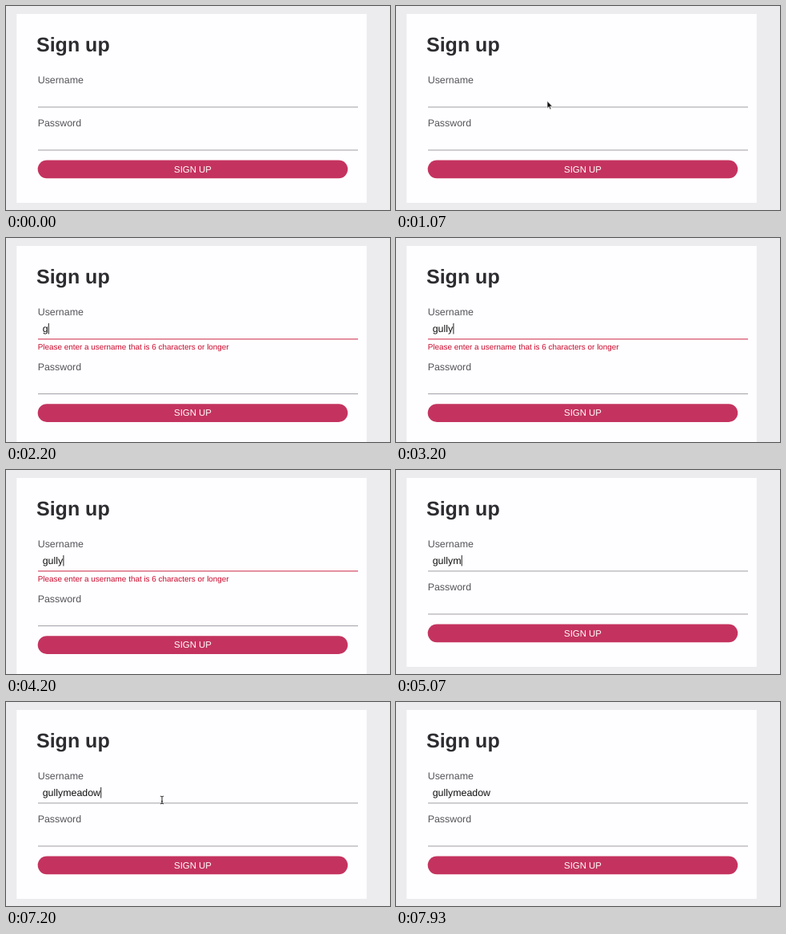
Write an HTML page that moves like this. It is 480 by 256 pixels and loops after 8 s.

```html
<!DOCTYPE html>
<html lang="en">
<head>
<meta charset="utf-8">
<title>Sign up form</title>
<style>
html, body { margin: 0; width: 100%; height: 100%; overflow: hidden; background: #ecebee; }
svg { display: block; width: 480px; height: 256px; }
text { font-family: "Liberation Sans", Arial, sans-serif; text-rendering: geometricPrecision; white-space: pre; }
.label { font-size: 12.4px; fill: #555459; }
.rule { height: 1px; width: 400px; fill: #a09fa3; }
</style>
</head>
<body>
<svg viewBox="0 0 480 256">
  <rect width="480" height="256" fill="#ecebee"/>
  <rect id="card" x="13.3" y="10" width="437.5" height="237" fill="#fefdff"/>
  <text x="38" y="57.3" font-size="25" font-weight="700" fill="#2d2c30">Sign up</text>
  <text class="label" x="39.7" y="97.2">Username</text>
  <text id="value" x="45.7" y="117.6" font-size="12.4" fill="#111"></text>
  <rect id="caret" y="107" width="1" height="13.5" fill="#222"/>
  <rect id="rule" class="rule" x="40" y="126.4"/>
  <text id="error" x="39.7" y="139.8" font-size="9.92" fill="#cb0a2c">Please enter a username that is 6 characters or longer</text>
  <g id="lower">
    <text class="label" x="39.7" y="151">Password</text>
    <rect class="rule" x="40" y="180.4"/>
    <rect x="39.7" y="193.5" width="387.5" height="22.7" rx="11.35" fill="#c4335f"/>
    <text x="233.5" y="208.7" font-size="11.4" text-anchor="middle" fill="#fff">SIGN UP</text>
  </g>
  <path id="arrow" d="M0 0V9.2L2.1 7.2L3.6 10.6L5.1 10L3.6 6.7H6.5Z" fill="#111" stroke="#fff" stroke-width=".7"/>
  <path id="beam" d="M-2-4.8Q0-4.8 0-3.6Q0-4.8 2-4.8M0-3.6V3.6M-2 4.8Q0 4.8 0 3.6Q0 4.8 2 4.8M-1 1.6H1" fill="none" stroke="#222"/>
</svg>
<script>
const LOOP = 8000, BLINK = 500, SHIFT = 14.7;
const FOCUS = 1200, MIN_LENGTH = 6;
const NAME = "gullymeadow";
const KEYS = [1730, 2600, 2800, 2950, 3130, 4730, 5400, 5600, 5870, 5930, 6070];
// Pointer keyframes: time, x, y
const ENTER = [[470, 204, 172], [870, 190, 122], [1070, 189, 119.3], [1250, 189, 119.3], [1730, 192, 122]];
const LEAVE = [[6870, 195, 123], [7250, 195, 123], [7460, 199, 172], [7670, 204, 226], [7860, 209, 262]];

const el = id => document.getElementById(id);
const value = el("value"), caret = el("caret"), rule = el("rule");
const show = (node, on) => node.setAttribute("visibility", on ? "visible" : "hidden");

function along(path, t) {
  if (t < path[0][0] || t >= path[path.length - 1][0]) return null;
  const i = path.findIndex(p => p[0] > t);
  const [t0, x0, y0] = path[i - 1], [t1, x1, y1] = path[i];
  const u = (t - t0) / (t1 - t0);
  return [x0 + (x1 - x0) * u, y0 + (y1 - y0) * u];
}

function drawPointer(t) {
  const pos = along(ENTER, t) || along(LEAVE, t);
  const overInput = pos && (t > FOCUS && pos[1] < 128 || t > 6000 && pos[1] > 158 && pos[1] < 181);
  show(el("arrow"), pos && !overInput);
  show(el("beam"), overInput);
  if (pos) el(overInput ? "beam" : "arrow").setAttribute("transform", `translate(${pos})`);
}

function render(t) {
  const typed = KEYS.filter(k => k <= t).length;
  const invalid = typed > 0 && typed < MIN_LENGTH;
  value.textContent = NAME.slice(0, typed);

  const since = t - (typed ? KEYS[typed - 1] : FOCUS);
  show(caret, since >= 0 && Math.floor(since / BLINK) % 2 === 0);
  caret.setAttribute("x", 45.9 + (typed ? value.getComputedTextLength() : 0));

  show(el("error"), invalid);
  rule.style.fill = invalid ? "#cb2545" : "";
  el("card").setAttribute("height", 237 + (invalid ? SHIFT : 0));
  el("lower").setAttribute("transform", `translate(0 ${invalid ? SHIFT : 0})`);
  drawPointer(t);
}

const start = performance.now();
function tick() {
  render((performance.now() - start) % LOOP);
  requestAnimationFrame(tick);
}
tick();
</script>
</body>
</html>
```
